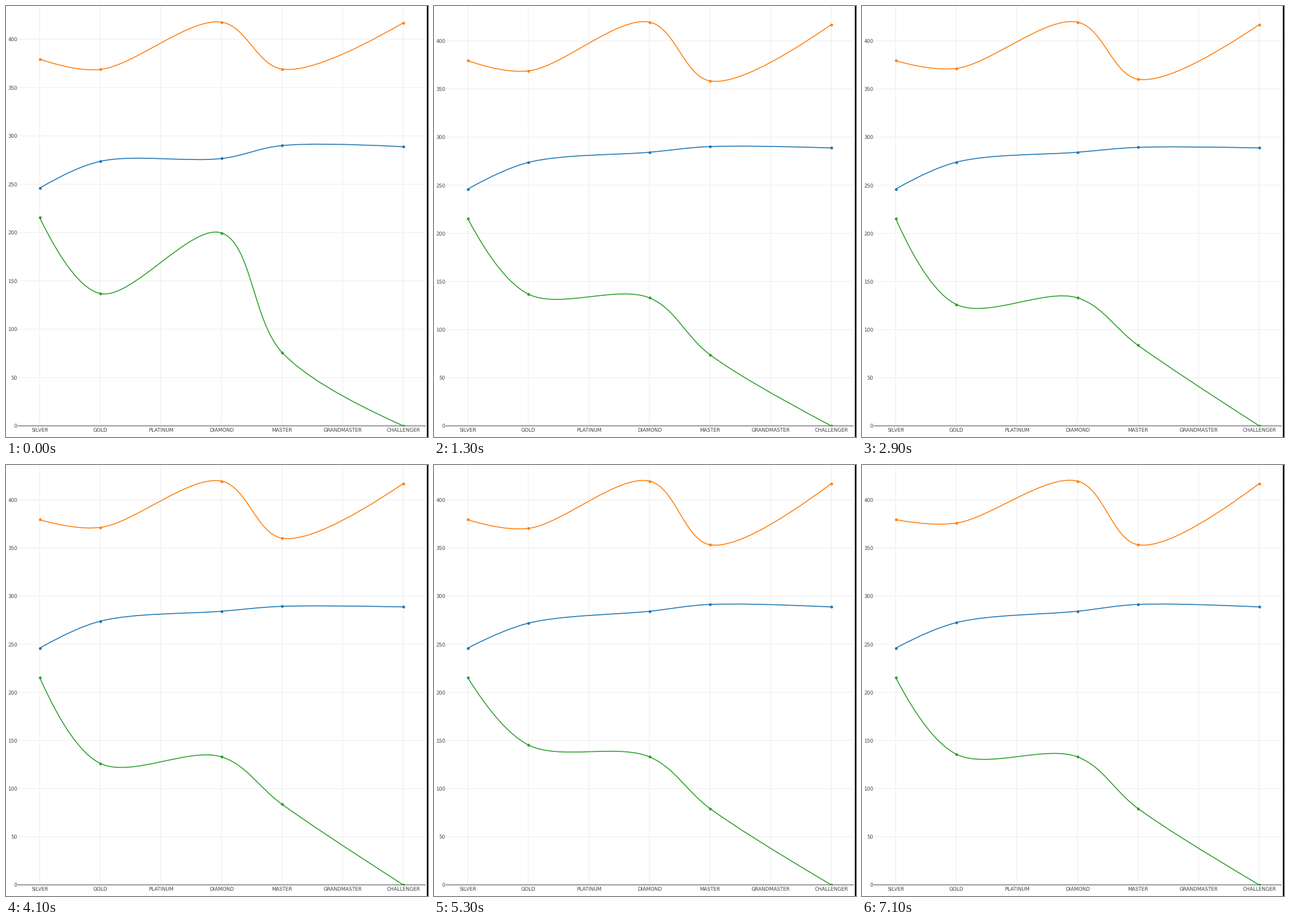
A matplotlib script that plays this animation: 720 px wide and 736 px high, repeating every 7.2 s.

```python
import numpy as np
import matplotlib.pyplot as plt
from matplotlib.animation import FuncAnimation
from matplotlib.patches import PathPatch, Rectangle
from matplotlib.path import Path

W, H, DPI = 720, 736, 100
STEP_MS, LOOP_MS = 100, 7200
PX = 72 / DPI                      # points per pixel
BASE, PEAK = 717, 689.45           # zero line, height of the largest value
LEFT, RIGHT = 20, 716

TIERS = ["SILVER", "GOLD", "PLATINUM", "DIAMOND",
         "MASTER", "GRANDMASTER", "CHALLENGER"]
TIER_X = 57.5 + 103.37 * np.arange(len(TIERS))
USED = [0, 1, 3, 4, 6]             # tiers that carry data
GOLD, DIAMOND, MASTER = 1, 2, 3    # columns of the data below

COLORS = ["#1f77b4", "#ff7f0e", "#2ca02c"]
START = np.array([
    [246.0, 273.7, 276.6, 290.0, 288.8],
    [379.4, 368.8, 417.7, 369.1, 416.9],
    [215.4, 136.9, 199.6, 76.0, 0.0],
])
# time in ms, tier, new value of each series
UPDATES = [
    (1200, DIAMOND, (284.3, 419.5, 133.0)),
    (1200, MASTER, (290.2, 358.4, 73.9)),
    (1800, MASTER, (289.4, 360.2, 83.7)),
    (2000, GOLD, (274.0, 371.4, 126.2)),
    (4200, MASTER, (291.4, 353.4, 79.3)),
    (5300, GOLD, (271.9, 370.4, 145.4)),
    (5900, GOLD, (272.5, 375.9, 135.8)),
]


def data_at(ms):
    data = START.copy()
    for when, tier, values in UPDATES:
        if ms >= when:
            data[:, tier] = values
    return data


def handles(prev, here, after):
    """Centripetal Catmull-Rom control points on both sides of a point."""
    d1, d2 = prev - here, after - here
    a1, a2 = np.sqrt(np.hypot(*d1)), np.sqrt(np.hypot(*d2))
    num = a2 ** 2 * d1 - a1 ** 2 * d2
    return (here + num / (3 * a2 * (a1 + a2)),
            here - num / (3 * a1 * (a1 + a2)))


def spline(pts):
    ctrl = [handles(*pts[i - 1:i + 2]) for i in range(1, len(pts) - 1)]
    verts = [pts[0], ctrl[0][0], pts[1]]
    codes = [Path.MOVETO, Path.CURVE3, Path.CURVE3]
    for i in range(2, len(pts) - 1):
        verts += [ctrl[i - 2][1], ctrl[i - 1][0], pts[i]]
        codes += [Path.CURVE4] * 3
    verts += [ctrl[-1][1], pts[-1]]
    codes += [Path.CURVE3] * 2
    return Path(verts, codes)


plt.rcParams.update({"font.family": "DejaVu Sans", "text.hinting": "none",
                     "toolbar": "None"})
fig = plt.figure(figsize=(W / DPI, H / DPI), dpi=DPI, facecolor="white")
ax = fig.add_axes([0, 0, 1, 1])
ax.set_xlim(0, W)
ax.set_ylim(H, 0)
ax.axis("off")


def rule(xs, ys, color="#eeeeee", width=1.1, z=1):
    return ax.plot(xs, ys, color=color, lw=width * PX, zorder=z, snap=False,
                   solid_capstyle="butt")[0]


def label(x, y, text, ha, va):
    return ax.text(x, y, text, ha=ha, va=va, color="#444444",
                   fontsize=8.55 * PX)


for x, name in zip(TIER_X, TIERS):
    rule([x, x], [0, BASE])
    label(x, 726.8, name, "center", "baseline")

LEVELS = np.arange(0, 401, 50)
grid = [rule([LEFT, RIGHT], [BASE, BASE]) for _ in LEVELS[1:]]
ticks = [label(19.3, BASE, str(v), "right", "baseline") for v in LEVELS]
rule([LEFT, RIGHT], [BASE, BASE], "#6a646a", 1.3, 2)
ax.add_patch(Rectangle((718, 0), 2, H, color="black", lw=0, zorder=6))

plot_area = Rectangle((0, 0), W, BASE, transform=ax.transData)
curves, dots = [], []
for color in COLORS:
    curve = PathPatch(Path([(0, 0), (0, 0)]), fc="none", ec=color,
                      lw=1.6 * PX, zorder=3, snap=False)
    ax.add_patch(curve)
    curve.set_clip_path(plot_area)
    dot, = ax.plot([], [], "o", color=color, ms=4.8 * PX, mew=0, zorder=4,
                   snap=False)
    dot.set_clip_path(plot_area)
    curves.append(curve)
    dots.append(dot)


def draw(frame):
    data = data_at(frame * STEP_MS)
    scale = PEAK / data.max()
    heights = BASE - scale * LEVELS
    for line, y in zip(grid, heights[1:]):
        line.set_ydata([y, y])
    for tick, y in zip(ticks, heights):
        tick.set_y(y + 3.3)
    for curve, dot, values in zip(curves, dots, data):
        pts = np.column_stack([TIER_X[USED], BASE - scale * values])
        curve.set_path(spline(pts))
        dot.set_data(pts[:, 0], pts[:, 1])
    return [*grid, *ticks, *curves, *dots]


anim = FuncAnimation(fig, draw, frames=LOOP_MS // STEP_MS, interval=STEP_MS,
                     init_func=lambda: draw(0), repeat=True, repeat_delay=0,
                     blit=False)
plt.show()
```
